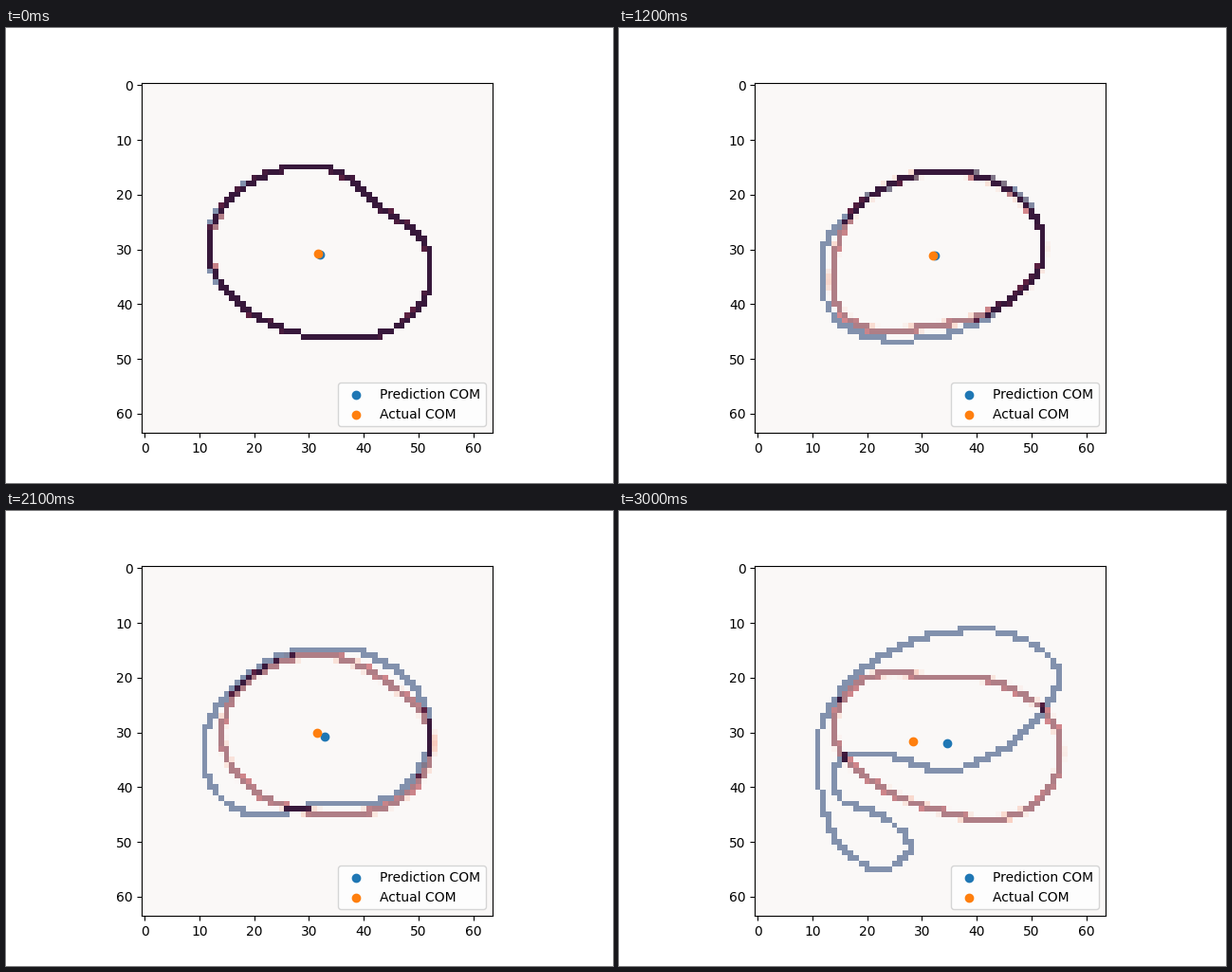
Recreate the animation shown at these times as a matplotlib script. Size 640x480 px, loop 3100 ms.

```python
import numpy as np
import matplotlib.pyplot as plt
from matplotlib.animation import FuncAnimation

SIZE = 64
FRAMES = 31
SAMPLES = 720
CENTRE = np.array([32, 31])
RADII = np.array([20, 16])
LEFT_EDGE = 11

rows, cols = np.mgrid[:SIZE, :SIZE]
turn = np.linspace(0, 1, SAMPLES, endpoint=False)


def smooth_loop(keys):
    """Closed Catmull-Rom curve through evenly timed keys."""
    keys = np.array(keys, float).reshape(len(keys), -1)
    pos = turn * len(keys)
    i = pos.astype(int)
    t = (pos - i)[:, None]
    a, b, c, d = (keys[(i + k) % len(keys)] for k in (-1, 0, 1, 2))
    return b + t / 2 * (c - a + t * (2 * a - 5 * b + 4 * c - d
                                     + t * (3 * (b - c) + d - a)))


def bent_ellipse(*percent):
    """Ellipse stretched in eight directions, clockwise from the left."""
    angle = np.pi + 2 * np.pi * turn[:, None]
    ring = np.hstack([np.cos(angle), np.sin(angle)])
    return CENTRE + RADII * ring * (1 + smooth_loop(percent) / 100)


def even_spacing(points):
    loop = np.vstack([points, points[:1]])
    dist = np.r_[0, np.cumsum(np.hypot(*np.diff(loop, axis=0).T))]
    return np.column_stack(
        [np.interp(turn * dist[-1], dist, axis) for axis in loop.T])


folded = even_spacing(smooth_loop([
    (11, 36), (12.5, 27), (20, 18), (32, 12.3), (46, 12), (55, 19),
    (50, 28.5), (43, 34), (34, 37), (23, 34), (15, 35), (15, 42),
    (23, 45.5), (28, 51), (22, 55), (14, 49)]))

# frame, actual outline, predicted outline
poses = [
    (0, bent_ellipse(2, 4, 0, -23, 0, 9, -6, -9),
     bent_ellipse(0, 3, 0, -23, 0, 9, -6, -9)),
    (8, bent_ellipse(0, 10, -12, -22, 0, 10, 0, -6),
     bent_ellipse(-11, 2, -15, -22, 0, 10, 0, -12)),
    (12, bent_ellipse(0, -12, -6, 3, 0, -14, -6, 14),
     bent_ellipse(-11, -13, -6, 1, 1, -15, -19, 6)),
    (16, bent_ellipse(0, 10, -16, -25, 0, 12, 0, -9),
     bent_ellipse(-10, -3, -22, -18, 0, 9, 1, -10)),
    (21, bent_ellipse(5, -4, 3, 4, 0, -6, -25, 12),
     bent_ellipse(-11, -8, -6, -12, 2, 1, -14, -15)),
    (25, bent_ellipse(5, 10, -37, -15, -5, 18, 12, -2),
     bent_ellipse(-15, -20, -19, -3, 7, -15, 6, -1)),
    (30, folded,
     bent_ellipse(-11, -8, -31, -13, 15, 18, -19, -26)),
]


def wobble(points, frame, amount):
    """Push an outline in and out along its radius."""
    rng = np.random.default_rng(100 + frame)
    rel = points - CENTRE
    angle = np.arctan2(rel[:, 1], rel[:, 0])
    shift = sum(rng.uniform(0.3, 0.8) * np.sin(n * angle + rng.uniform(0, 6.28))
                for n in (2, 3))
    unit = rel / np.hypot(*rel.T)[:, None]
    return points + amount * shift[:, None] * unit


def outlines(frame):
    start, end = next(pair for pair in zip(poses, poses[1:])
                      if frame <= pair[1][0])
    u = (frame - start[0]) / (end[0] - start[0])
    for a, b in zip(start[1:], end[1:]):
        points = wobble(a + (b - a) * u, frame, np.sin(np.pi * u))
        points[:, 0] = np.maximum(points[:, 0], LEFT_EDGE)
        yield points


def hard_line(points):
    mask = np.zeros((SIZE, SIZE))
    x, y = np.floor(points + 0.5).astype(int).T
    mask[y, x] = 1
    return mask


def soft_line(points, softness):
    d = np.hypot(cols[..., None] - points[:, 0],
                 rows[..., None] - points[:, 1]).min(axis=2)
    core = np.clip(1.35 - 0.8 * d, 0, 1)
    fringe = np.clip(1 - 1.2 * d, 0, 1) * softness
    return np.where(hard_line(points) > 0, core, fringe)


def centre_of_mass(grid):
    return (cols * grid).sum() / grid.sum(), (rows * grid).sum() / grid.sum()


fig, ax = plt.subplots(figsize=(6.4, 4.8), dpi=100)
blank = np.zeros((SIZE, SIZE))
actual_img = ax.imshow(blank, cmap="Blues", vmin=0, vmax=1)
pred_img = ax.imshow(blank, cmap="Reds", vmin=0, vmax=1, alpha=0.5)
pred_dot = ax.scatter([32], [32], color="tab:blue", label="Prediction COM")
actual_dot = ax.scatter([32], [32], color="tab:orange", label="Actual COM")
ax.set_xlim(-0.5, SIZE - 0.5)
ax.set_ylim(SIZE - 0.5, -0.5)
ax.legend(loc="lower right")


def update(frame):
    actual_points, pred_points = outlines(frame)
    actual = hard_line(actual_points)
    pred = soft_line(pred_points, min(1, frame / 8))
    actual_img.set_data(actual)
    pred_img.set_data(pred)
    actual_dot.set_offsets([centre_of_mass(actual)])
    pred_dot.set_offsets([centre_of_mass(pred)])
    return actual_img, pred_img, pred_dot, actual_dot


anim = FuncAnimation(fig, update, frames=FRAMES, interval=100,
                     repeat=True, repeat_delay=0)
plt.show()
```
